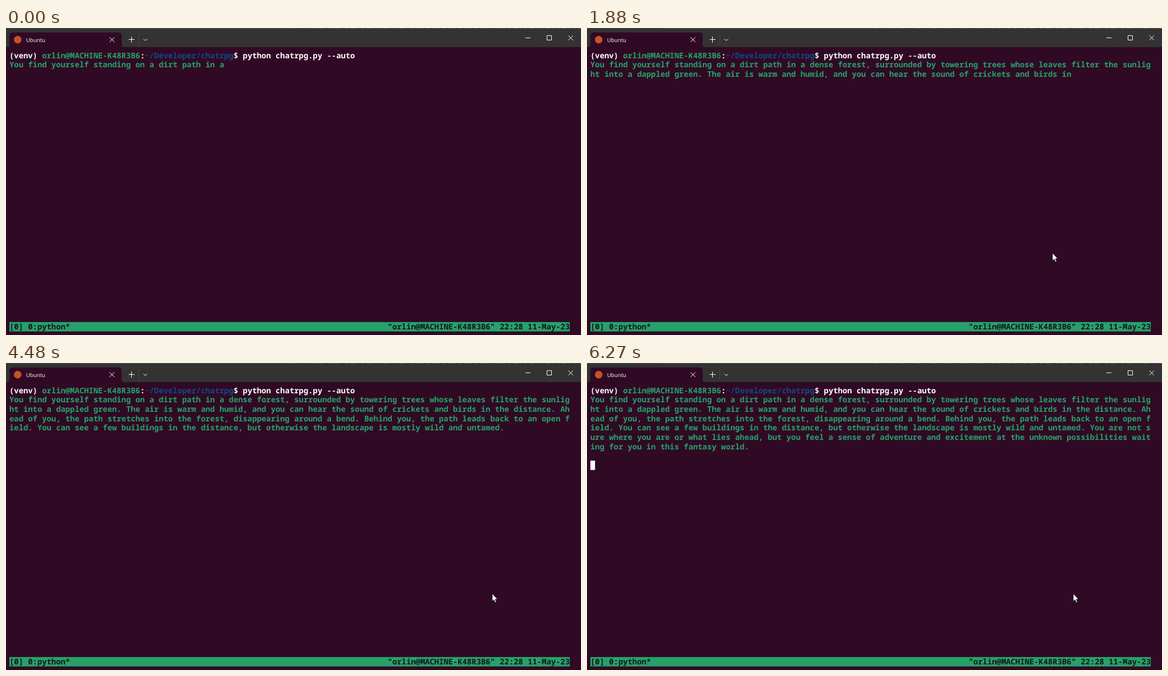
An HTML page that plays this animation: 1024 px wide and 547 px high, repeating every 8000 ms.

```html
<!DOCTYPE html>
<html lang="en">
<head>
<meta charset="utf-8">
<title>Terminal adventure</title>
<style>
  html, body { margin: 0; width: 100%; height: 100%; overflow: hidden; background: #300a24; }
  svg { display: block; width: 1024px; height: 547px; }
  text { white-space: pre; text-rendering: geometricPrecision; }
  .mono { font: 600 13.861px "Noto Sans Mono", "DejaVu Sans Mono", monospace; font-variant-ligatures: none; }
  .tab { font: 500 9.7px "Open Sans", "Noto Sans", sans-serif; }
  .icon { fill: none; stroke: #fff; stroke-width: 1; }
</style>
</head>
<body>
<svg id="stage" viewBox="0 0 1024 547">
  <rect width="1024" height="547" fill="#300a24"/>
  <rect width="1024" height="34" fill="#333"/>
  <path d="M0 .5H1024" stroke="#484848"/>
  <path d="M130 .5H498M524 .5H544" stroke="#5a5a5a"/>
  <path d="M500 .5H522M546 .5H1024" stroke="#6a6a6a" stroke-dasharray="5 4 9 3 2 6"/>
  <path d="M2 34Q6 34 6 30V14Q6 8 12 8H200Q206 8 206 14V30Q206 34 210 34Z" fill="#300a24"/>
  <circle cx="20.8" cy="20.8" r="6.8" fill="#c4532b"/>
  <text class="tab" x="35.8" y="24.8" fill="#fff">Ubuntu</text>
  <path class="icon" d="M184.500 16.500l8.500 8.500m0-8.500l-8.500 8.500M218.500 20.500h10.500M223.500 15.500v10.500M244.800 19.300l3.300 3.300l3.300-3.300"/>
  <path d="M236.500 11V31" stroke="#484848"/>
  <path class="icon" d="M925 17.500h9M963.500 13.500h8v8h-8zM1001.500 13.500l8.300 8.300m0-8.300l-8.300 8.300"/>
  <g id="screen" class="mono"></g>
  <path id="pointer" d="M0 0V13.500L3 10.700L5.100 15.800L7.300 14.900L5.200 10H9.300Z" fill="#fff" stroke="#000" stroke-width=".7"/>
</svg>
<script>
const LOOP = 8000, DONE = 6270;
const COLS = 120, LEFT = 6, TOP = 40.6, CELL = 8.317, ROW = 16.667, BASE = 13.2;
const GREEN = '#26a269', BLUE = '#12488b', WHITE = '#fff', INK = '#171421';

const STORY =
  'You find yourself standing on a dirt path in a dense forest, surrounded by towering trees ' +
  'whose leaves filter the sunlight into a dappled green. The air is warm and humid, and you can ' +
  'hear the sound of crickets and birds in the distance. Ahead of you, the path stretches into ' +
  'the forest, disappearing around a bend. Behind you, the path leads back to an open field. ' +
  'You can see a few buildings in the distance, but otherwise the landscape is mostly wild and ' +
  'untamed. You are not sure where you are or what lies ahead, but you feel a sense of adventure ' +
  'and excitement at the unknown possibilities waiting for you in this fantasy world.';

// time, characters shown, screen refreshes so far
const TYPING = [
  [0, 46, 0], [830, 126, 12], [1320, 170, 19], [2510, 282, 36], [3360, 361, 48],
  [3430, 368, 49], [4200, 440, 60], [4480, 466, 64], [5020, 518, 72],
  [5720, 584, 82], [5860, 596, 84], [DONE, STORY.length, 90]
];

// time, x, y of the pointer tip
const POINTER = [
  [350, 838, 547], [480, 832, 490], [620, 825, 420], [760, 822, 394], [1320, 822, 394],
  [1670, 827, 400], [1810, 829, 401], [2510, 829, 401], [2800, 840, 406],
  [3150, 862, 413], [3360, 866, 411]
];

const screen = document.getElementById('screen');
const pointer = document.getElementById('pointer');

function add(parent, tag, attrs, text = '') {
  const el = document.createElementNS('http://www.w3.org/2000/svg', tag);
  for (const name in attrs) el.setAttribute(name, attrs[name]);
  el.textContent = text;
  return parent.appendChild(el);
}

const colX = col => LEFT + col * CELL;
const rowY = row => TOP + row * ROW;

function print(col, row, text, fill) {
  return add(screen, 'text', { x: colX(col), y: rowY(row) + BASE, fill }, text);
}

function block(row, cols, fill) {
  return add(screen, 'rect', { x: LEFT, y: rowY(row), width: cols * CELL, height: ROW, fill });
}

let col = 0;
for (const [text, fill] of [
  ['(venv) ', WHITE], ['orlin@MACHINE-K48R3B6', GREEN], [':', WHITE],
  ['~/Developer/chatrpg', BLUE], ['$ python chatrpg.py --auto', WHITE]
]) {
  print(col, 0, text, fill);
  col += text.length;
}

const lines = Array.from({ length: 6 }, (_, i) => print(0, i + 1, '', GREEN));
const caret = block(8, 1, WHITE);

block(29, COLS, GREEN);
print(0, 29, '[0] 0:python*', INK);
print(81, 29, '"orlin@MACHINE-K48R3B6" 22:28 11-May-23', INK);

function segment(table, t) {
  let i = 0;
  while (i < table.length - 2 && t >= table[i + 1][0]) i++;
  return [table[i], table[i + 1]];
}

function typedAt(t) {
  const [a, b] = segment(TYPING, t);
  const steps = b[2] - a[2];
  const part = Math.min(1, (t - a[0]) / (b[0] - a[0]));
  const step = Math.floor(part * steps + 0.02);
  return Math.round(a[1] + (b[1] - a[1]) * step / steps);
}

function pointerAt(t) {
  const [a, b] = segment(POINTER, t);
  const part = Math.min(1, Math.max(0, (t - a[0]) / (b[0] - a[0])));
  return [1, 2].map(k => a[k] + (b[k] - a[k]) * part);
}

let shown = -1;
function draw(t) {
  const count = typedAt(t);
  if (count !== shown) {
    const typed = STORY.slice(0, count);
    lines.forEach((line, i) => line.textContent = typed.slice(i * COLS, (i + 1) * COLS));
    shown = count;
  }
  caret.setAttribute('visibility', t >= DONE ? 'visible' : 'hidden');
  // the pointer moves only when the screen refreshes
  const tick = Math.floor(t / 70 + 0.02) * 70;
  pointer.setAttribute('visibility', tick >= POINTER[0][0] ? 'visible' : 'hidden');
  pointer.setAttribute('transform', `translate(${pointerAt(tick)})`);
}

const start = performance.now();
function frame() {
  draw((performance.now() - start) % LOOP);
  requestAnimationFrame(frame);
}
draw(0);
requestAnimationFrame(frame);
</script>
</body>
</html>
```
